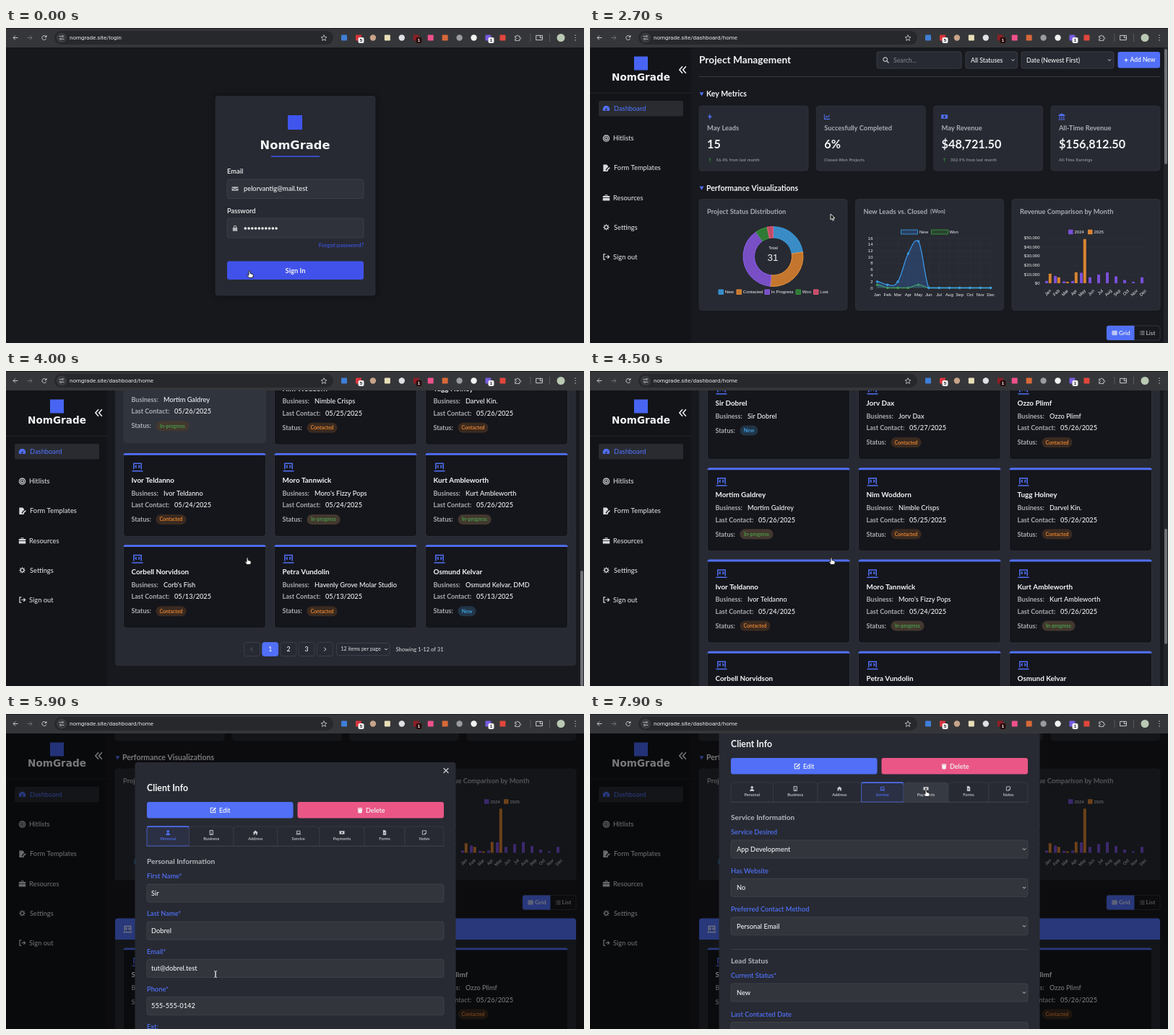
Write an HTML page with a canvas that moves like this. It is 800 by 437 pixels and loops after 8000 ms.

```html
<!DOCTYPE html>
<html lang="en">
<head>
<meta charset="utf-8">
<title>Lead dashboard</title>
<style>
html, body { margin: 0; width: 100%; height: 100%; overflow: hidden; background: #18191e; }
canvas { display: block; width: 800px; height: 437px; }
</style>
</head>
<body>
<canvas id="stage"></canvas>
<script>
const LOOP = 8000, BLUE = '#5170f7', WHITE = '#f3f4f6', GREY = '#a9acb3', CARD = '#272a32', PAGE = '#18191e';
const SANS = 'Lato, sans-serif', ARIAL = '"Liberation Sans", sans-serif', WIDE = '"DejaVu Sans", sans-serif';
const BRAND = 'NomGrade';
const MONTHS = 'Jan Feb Mar Apr May Jun Jul Aug Sep Oct Nov Dec'.split(' ');

const canvas = document.getElementById('stage'), ctx = canvas.getContext('2d');
const ratio = window.devicePixelRatio || 1;
canvas.width = 800 * ratio;
canvas.height = 437 * ratio;

// Icons live in a 16 x 16 box
const SOLID = {
  bolt: 'M9 0L3 9h4l-1 7 7-10H8z',
  money: 'M0 3h16v10H0zM8 5.5a2.5 2.5 0 1 0 .01 0z',
  bank: 'M8 0L0 4v2h16V4zM2 7h2v6H2zM7 7h2v6H7zM12 7h2v6h-2zM0 14h16v2H0z',
  gauge: 'M8 1a8 8 0 0 0-7 12h14a8 8 0 0 0-7-12zM11 4l-2 5a2 2 0 1 1-1.5-.5z',
  form: 'M1 0h8l3 3v3l-5 5v3h5v2H1zM15 6l-6 6v2h2l6-6z',
  kit: 'M5 1h6v3h5v4H0V4h5zM6.5 2.5V4h3V2.5zM0 9h16v6H0z',
  mail: 'M0 3h16v2L8 9 0 5zM0 6.5l8 4 8-4V13H0z',
  lock: 'M2 7h12v9H2zM4 7V5a4 4 0 0 1 8 0v2h-2V5a2 2 0 0 0-4 0v2z',
  trash: 'M1 2h4l1-1h4l1 1h4v2H1zM2 5h12l-1 11H3z',
  person: 'M8 0a4 4 0 1 0 .01 0zM1 16c0-9 14-9 14 0z',
  home: 'M8 1L0 8h2v7h4v-5h4v5h4V8h2z',
  file: 'M3 0h6l4 4v12H3zM5 8v1h6V8zM5 11v1h6v-1z',
  down: 'M0 2h16L8 15z',
  dots: 'M7 1h2v2H7zM7 7h2v2H7zM7 13h2v2H7z'
};
const LINE = {
  chart: 'M1 2v12h14M4 10l3-3 3 2 4-5',
  target: 'M8 1a7 7 0 1 0 .01 0zM8 4.5a3.5 3.5 0 1 0 .01 0zM7.5 8h1',
  gear: 'M8 4a4 4 0 1 0 .01 0zM8 1v3M8 12v3M1 8h3M12 8h3M3 3l2 2M11 11l2 2M13 3l-2 2M5 11l-2 2',
  exit: 'M6 2H2v12h4M6 8h9M11 4l4 4-4 4',
  code: 'M2.5 11V2.5h11V11M0 13.5h16M6.5 5L5 7l1.5 2M9.5 5L11 7 9.5 9',
  search: 'M6.5 1.5a5 5 0 1 0 .01 0zM10.5 10.5l4.5 4.5',
  grid: 'M1 2h14v12H1zM1 6h14M1 10h14M6 2v12M11 2v12',
  list: 'M5 3h11M5 8h11M5 13h11M1 3h2M1 8h2M1 13h2',
  edit: 'M9 2H2v12h12V8M7 9l7-7 1 1-7 7z',
  office: 'M3 1h10v14H3zM6 4h1M9 4h1M6 7h1M9 7h1M7 15v-4h2v4',
  laptop: 'M3 11V3h10v8zM0 13.5h16',
  note: 'M2 2h12v8l-4 4H2zM14 10h-4v4',
  collapse: 'M8 1L2 8l6 7M15 1L9 8l6 7',
  back: 'M15 8H2M8 2L2 8l6 6',
  next: 'M1 8h13M8 2l6 6-6 6',
  reload: 'M13.5 10a6 6 0 1 1-.5-5M14 1v5H9',
  tune: 'M1 4h6M11 2a2 2 0 1 0 .01 0zM9 12h6M5 10a2 2 0 1 0 .01 0z',
  star: 'M8 1l2 5 5 .5-4 3.5 1.3 5L8 12.3l-4.3 2.7L5 10 1 6.5 6 6z',
  puzzle: 'M2 4h4a2 2 0 1 1 4 0h3v4a2 2 0 1 1 0 3v4H2v-4a2 2 0 1 0 0-3z',
  panel: 'M1 3h14v10H1zM10 3v5h5',
  left: 'M10 3L5 8l5 5', right: 'M6 3l5 5-5 5', open: 'M2 5l6 6 6-6',
  close: 'M2 2l12 12M14 2L2 14', up: 'M8 15V2M4 6l4-4 4 4', plus: 'M8 1v14M1 8h14'
};
const CURSOR = {
  arrow: 'M0 0v8l1.9-1.7 1.3 2.9 1.3-.6-1.3-2.8H6z',
  hand: 'M-1 5.5V.8a1 1 0 0 1 2 0V3.5l3 .8q1.5.4 1.2 2L4.5 9.5H-.5L-3.5 5.8q.6-1.3 2.5.4z'
};

function box(x, y, w, h, r, fill, stroke, width = 0.8) {
  ctx.beginPath();
  ctx.roundRect(x, y, w, h, r);
  if (fill) { ctx.fillStyle = fill; ctx.fill(); }
  if (stroke) { ctx.strokeStyle = stroke; ctx.lineWidth = width; ctx.stroke(); }
}
function dot(x, y, r, fill) { box(x - r, y - r, 2 * r, 2 * r, r, fill); }
// y marks mid-height of capitals
function text(s, x, y, size, color = WHITE, weight = 500, align = 'left', face = SANS) {
  ctx.font = `${weight} ${size}px ${face}`;
  ctx.textAlign = align;
  ctx.fillStyle = color;
  ctx.fillText(s, x, y + size * 0.35);
}
function icon(name, x, y, size, color, width = 1.8) {
  ctx.save();
  ctx.translate(x - size / 2, y - size / 2);
  ctx.scale(size / 16, size / 16);
  ctx.fillStyle = ctx.strokeStyle = color;
  ctx.lineWidth = width;
  if (SOLID[name]) ctx.fill(new Path2D(SOLID[name]), 'evenodd');
  else ctx.stroke(new Path2D(LINE[name]));
  ctx.restore();
}
function track(keys, t, ease = u => u) {
  if (t <= keys[0][0]) return keys[0].slice(1);
  for (let i = 1; i < keys.length; i++) {
    const [a, b] = [keys[i - 1], keys[i]];
    if (t < b[0]) {
      const u = ease((t - a[0]) / (b[0] - a[0]));
      return a.slice(1).map((v, k) => v + (b[k + 1] - v) * u);
    }
  }
  return keys.at(-1).slice(1);
}
const smooth = u => u * u * (3 - 2 * u);
const clamp = u => Math.min(1, Math.max(0, u));

function browserBar(path) {
  box(0, 0, 800, 27, 0, '#353639');
  box(0, 0, 800, 1, 0, '#1c1c1e');
  icon('back', 13, 13.5, 8, '#d5d6d8');
  icon('next', 33, 13.5, 8, '#77787c');
  icon('reload', 53, 13.5, 8, '#d5d6d8');
  box(67, 4, 386, 19, 9.5, '#27282b');
  dot(77, 13.5, 7, '#3a3b3f');
  icon('tune', 77, 13.5, 7.5, '#d5d6d8');
  text(BRAND.toLowerCase() + '.site' + path, 88, 13.5, 8, '#e4e5e7', 400, 'left', 'Roboto, sans-serif');
  icon('star', 440, 13.5, 9, '#c9cacd', 1.5);
  const extensions = ['#3f7fd6', '#d8363c', '#c9a48a', '#e8dfb8', '#dfe1e4', '#8c1f25', '#f0508c', '#d8683a', '#9a9b9e', '#f1f1f1', '#7a5be0', '#e0463c'];
  extensions.forEach((color, i) => {
    const x = 468 + i * 19.95;
    if ([2, 4, 8, 9].includes(i)) dot(x, 13.5, 4.2, color);
    else box(x - 4, 9.5, 8, 8, 1, color);
  });
  [[491, '5'], [571, '1'], [671, '1']].forEach(([x, n]) => {
    box(x - 3.5, 13, 8, 8, 2, x === 571 ? '#2a0d10' : '#f0f0f2');
    text(n, x + 0.5, 17, 6, x === 571 ? '#fff' : '#222', 700, 'center', ARIAL);
  });
  icon('puzzle', 708, 13.5, 9, '#d5d6d8', 1.5);
  icon('panel', 738, 13.5, 10, '#d5d6d8', 1.5);
  box(725.5, 8, 1, 11, 0, '#5a5b60');
  box(752, 8, 1, 11, 0, '#5a5b60');
  dot(768, 13.5, 5.5, '#b9c9b4');
  icon('dots', 788, 13.5, 9, '#d5d6d8');
}

function login() {
  ctx.shadowColor = 'rgba(0,0,0,.4)';
  ctx.shadowBlur = 8;
  box(289.5, 94, 222, 277.5, 4, CARD);
  ctx.shadowBlur = 0;
  box(390, 121, 20, 20, 0, '#3f55ee');
  text(BRAND, 400, 162, 16.3, WHITE, 700, 'center', WIDE);
  box(367, 177.5, 67, 1.6, 0, '#3f55ee');
  text('Email', 306, 199, 9.3, WHITE, 600);
  box(306, 210, 189, 26.5, 3, '#2f323a', '#3f434c');
  icon('mail', 317, 223, 9, '#b4b6bb');
  text('pelorvantig@mail.test', 329, 223, 9.3);
  text('Password', 306, 253.5, 9.3, WHITE, 600);
  box(306, 264, 189, 27, 3, '#2f323a', '#3f434c');
  icon('lock', 317, 277.5, 8.5, '#b4b6bb');
  for (let i = 0; i < 10; i++) dot(331.3 + i * 4.75, 278, 1.8, WHITE);
  text('Forgot password?', 495, 301.5, 8, '#3f55ee', 500, 'right');
  box(306, 323.5, 189, 25.5, 3, '#4152ea');
  text('Sign In', 400.5, 336.5, 9.3, WHITE, 700, 'center');
}

function sidebar() {
  box(0, 27, 140, 410, 0, '#131418');
  box(61, 39.5, 19, 19, 0, '#4765f2');
  text(BRAND, 70.5, 68.5, 13.6, WHITE, 700, 'center', WIDE);
  icon('collapse', 128, 58, 11, WHITE, 2.2);
  box(0, 89.5, 140, 1, 0, '#25272c');
  box(12, 101, 117, 21.5, 3, '#292b30');
  const items = [['gauge', 'Dashboard'], ['target', 'Hitlists'], ['form', 'Form Templates'], ['kit', 'Resources'], ['gear', 'Settings'], ['exit', 'Sign out']];
  items.forEach(([name, label], i) => {
    const y = 112 + i * 41.1, color = i ? '#d9dade' : BLUE;
    icon(name, 22.5, y, 9.5, color, 2);
    text(label, i % 2 ? 32 : 33, y, 9.3, color);
  });
}

function select(label, x, w) {
  box(x, 33, w, 23, 3, CARD, '#3f434c');
  text(label, x + 7, 44.5, 8.7);
  icon('open', x + w - 6, 44.5, 5, WHITE, 3);
}
function section(label, y) {
  icon('down', 154.5, y, 6, BLUE);
  text(label, 161, y, 10.5, WHITE, 700);
}
function metric(i, name, label, value, note, rising) {
  const x = 151 + i * 162.3;
  box(x, 108, 151, 90, 4, CARD, '#30333b');
  icon(name, x + 15, 123, 9, BLUE);
  text(label, x + 11, 139, 9.3, GREY, 700);
  text(value, x + 11, 161.5, 16.2, WHITE, 700);
  if (rising) icon('up', x + 15, 183, 6, '#2f9a3c', 2);
  ctx.letterSpacing = '.3px';
  text(note, x + (rising ? 23.5 : 11), 183, 5.4, GREY);
  ctx.letterSpacing = '0px';
}

function doughnut(grow) {
  const parts = [['New', 7, '#3a8cc6', '#36a2eb', 178], ['Contacted', 9, '#c4762f', '#ff9f40', 203], ['In Progress', 12, '#784fc4', '#9966ff', 242], ['Won', 2, '#2f7a34', '#3fa046', 285], ['Lost', 1, '#c24b68', '#ff6384', 309.5]];
  let angle = -Math.PI / 2;
  for (const [label, count, fill, edge, x] of parts) {
    const end = angle + count / 31 * 2 * Math.PI * grow;
    ctx.beginPath();
    ctx.arc(253.5, 317, 41.5, angle, end);
    ctx.arc(253.5, 317, 26, end, angle, true);
    ctx.closePath();
    ctx.fillStyle = fill; ctx.strokeStyle = edge; ctx.lineWidth = 0.8;
    if (grow) { ctx.fill(); ctx.stroke(); }
    angle = end;
    box(x, 363, 6.5, 6.5, 0, fill, edge);
    text(label, x + 8.8, 366.3, 6, WHITE, 400, 'left', ARIAL);
  }
  text('Total', 253.5, 304.5, 6, WHITE, 400, 'center', ARIAL);
  text('31', 253, 318, 13.5, WHITE, 400, 'center', ARIAL);
}

function curve(values, color, fill, grow) {
  const px = i => 397.5 + i * 14.27, py = i => 360.5 - values[i] * 4.31 * grow;
  const limit = y => Math.min(360.5, Math.max(291.5, y));
  const slope = i => i && i < 11 ? (py(i + 1) - py(i - 1)) * 0.2 : 0;
  ctx.beginPath();
  ctx.moveTo(px(0), py(0));
  for (let i = 1; i < 12; i++)
    ctx.bezierCurveTo(px(i - 1) + 5.7, limit(py(i - 1) + slope(i - 1)), px(i) - 5.7, limit(py(i) - slope(i)), px(i), py(i));
  ctx.strokeStyle = color; ctx.lineWidth = 1.3;
  ctx.stroke();
  ctx.lineTo(px(11), 360.5);
  ctx.lineTo(px(0), 360.5);
  ctx.fillStyle = fill;
  ctx.fill();
  values.forEach((v, i) => dot(px(i), py(i), 1.7, color));
}
function lineChart(grow) {
  for (let n = 0; n <= 16; n += 2) {
    const y = 360.5 - n * 4.31;
    box(394, y, 161, 0.6, 0, '#30333b');
    text(n, 391.5, y, 6, WHITE, 400, 'right', ARIAL);
  }
  MONTHS.forEach((m, i) => {
    box(397.5 + i * 14.27, 291.5, 0.6, 72, 0, '#30333b');
    text(m, 397.5 + i * 14.27, 370, 6, WHITE, 400, 'center', ARIAL);
  });
  box(430.5, 280, 23, 6, 0, '#293f63', '#36a2eb');
  text('New', 456, 283, 6, WHITE, 400, 'left', ARIAL);
  box(472.5, 280, 23, 6, 0, '#28452f', '#3fa046');
  text('Won', 497.5, 283, 6, WHITE, 400, 'left', ARIAL);
  curve([1, 0, 0, 0, 1, 0, 0, 0, 0, 0, 0, 0], '#43a047', 'rgba(67,160,71,.25)', grow);
  curve([2, 1, 2, 11, 15, 0, 0, 0, 0, 0, 0, 0], '#3c9be8', 'rgba(54,120,220,.28)', grow);
}
function barChart(grow) {
  for (let k = 0; k <= 50; k += 10) {
    const y = 354 - k * 1.255;
    box(626, y, 144, 0.5, 0, '#2e3139');
    text(k ? `$${k},000` : '$0', 622.5, y, 6, WHITE, 400, 'right', ARIAL);
  }
  const series = [['2024', 662, '#784fd8', [2.5, 8, 2, 2.5, 11.5, 6.5, 9.5, 11.8, 7.5, 3.5, 1.5, 6.5]], ['2025', 689, '#d98432', [10.5, 6.5, 1.5, 12, 48.7]]];
  series.forEach(([year, x, color, values], s) => {
    box(x, 279.7, 6.5, 6.5, 0, color);
    text(year, x + 8.5, 283, 6, WHITE, 400, 'left', ARIAL);
    values.forEach((v, i) => box(630 + i * 12 + s * 4.8, 354 - v * 1.255 * grow, 4, v * 1.255 * grow, 0, color));
  });
  MONTHS.forEach((m, i) => {
    ctx.save();
    ctx.translate(637 + i * 12, 363.5);
    ctx.rotate(-Math.PI / 4);
    text(m, 0, 0, 6, WHITE, 400, 'right', ARIAL);
    ctx.restore();
  });
}

const LEADS = [
  ['Sir Dobrel', 'Sir Dobrel', '', 'New'], ['Jorv Dax', 'Jorv Dax', '27', 'Contacted'], ['Ozzo Plimf', 'Ozzo Plimf', '26', 'Contacted'],
  ['Mortim Galdrey', 'Mortim Galdrey', '26', 'In-progress'], ['Nim Woddorn', 'Nimble Crisps', '25', 'Contacted'], ['Tugg Holney', 'Darvel Kin.', '26', 'Contacted'],
  ['Ivor Teldanno', 'Ivor Teldanno', '24', 'Contacted'], ['Moro Tannwick', "Moro's Fizzy Pops", '24', 'In-progress'], ['Kurt Ambleworth', 'Kurt Ambleworth', '26', 'In-progress'],
  ['Corbell Norvidson', "Corb's Fish", '13', 'Contacted'], ['Petra Vundolin', 'Havenly Grove Molar Studio', '13', 'Contacted'], ['Osmund Kelvar', 'Osmund Kelvar, DMD', '13', 'New']
];
const STATUS = { New: ['#213547', '#42a5e8', 25], Contacted: ['#3b2a20', '#f08a30', 42], 'In-progress': ['#43382f', '#48a548', 46] };

function lead([name, business, day, status], i, hover) {
  const x = 162.5 + (i % 3) * 209, y = 486 + Math.floor(i / 3) * 127.25 - (hover ? 2.5 : 0);
  box(x, y, 197, 115.5, 4, hover ? '#30343d' : '#15161b', '#34373f');
  box(x, y, 197, 2.8, [4, 4, 0, 0], BLUE);
  icon('code', x + 19.5, y + 19.5, 15, BLUE, 1.6);
  text(name, x + 11, y + 37.5, 9.9, WHITE, 700);
  const row = (label, dy) => text(label, x + 11, y + dy, 9, GREY, 700);
  row('Business:', 55.5);
  text(business, x + 55.5, y + 55.5, 9.2);
  if (day) {
    row('Last Contact:', 72);
    text(`05/${day}/2025`, x + 70.5, y + 72, 9.2);
  }
  const sy = day ? 92 : 75.5, [fill, color, w] = STATUS[status];
  row('Status:', sy);
  box(x + 45, y + sy - 7, w, 14, 7, fill);
  text(status, x + 45 + w / 2, y + sy, 7, color, 600, 'center');
}

function dashboard(t, scroll) {
  ctx.save();
  ctx.translate(0, -scroll);
  text('Project Management', 151, 44.5, 13.7, WHITE, 700);
  box(397, 33, 117, 23, 3, CARD, '#3f434c');
  icon('search', 409.5, 44.5, 9, '#c5c7cb', 2.2);
  text('Search...', 420, 44.5, 8.7, '#7d8088');
  select('All Statuses', 520, 71.5);
  select('Date (Newest First)', 597, 128);
  box(730.5, 33, 58.5, 22.5, 3, BLUE);
  icon('plus', 742, 44.5, 6, WHITE, 3);
  text('Add New', 747.5, 44.5, 8.5, WHITE, 600);
  box(151, 67, 638, 1, 0, '#393b41');

  section('Key Metrics', 91.5);
  metric(0, 'bolt', 'May Leads', '15', '36.4% from last month', true);
  metric(1, 'chart', 'Succesfully Completed', '6%', 'Closed-Won Projects');
  metric(2, 'money', 'May Revenue', '$48,721.50', '302.9% from last month', true);
  metric(3, 'bank', 'All-Time Revenue', '$156,812.50', 'All-Time Earnings');

  section('Performance Visualizations', 222);
  ['Project Status Distribution', 'New Leads vs. Closed', 'Revenue Comparison by Month'].forEach((title, i) => {
    const x = 151 + i * 216.5;
    box(x, 237.5, 205, 154, 4, CARD, '#30333b');
    text(title, x + 11, 254.5, 9.25, GREY, 700);
  });
  text('(Won)', 471, 254.5, 7.8, GREY, 700);
  const grow = 1 - (1 - clamp((t - 1450) / 900)) ** 4;
  doughnut(grow);
  lineChart(grow);
  barChart(grow);

  box(715, 413, 74, 20, 3, PAGE, '#3a3d45');
  box(715, 413, 38.5, 20, [3, 0, 0, 3], BLUE);
  icon('grid', 726, 423, 7, WHITE);
  text('Grid', 732, 423, 8.3, WHITE, 600);
  icon('list', 764, 423, 7, '#c5c7cb');
  text('List', 769.5, 423, 8.3, '#c5c7cb');

  box(151, 445, 638, 590.5, 4, CARD);
  box(151, 445, 638, 29.5, [4, 4, 0, 0], BLUE);
  icon('code', 168.5, 460, 12, WHITE);
  text('Projects', 180, 460, 10.3, WHITE, 700);
  const hovered = t > 3600 && t < 4080 ? 3 : t >= 4080 && t < 4500 ? 9 : -1;
  LEADS.forEach((entry, i) => lead(entry, i, i === hovered));

  ['', '1', '2', '3', ''].forEach((n, i) => {
    const x = 329.5 + i * 25.2;
    box(x, 1003, 22, 19, 3, i === 1 ? BLUE : CARD, i === 1 ? BLUE : '#40434c');
    if (n) text(n, x + 11, 1012.5, 8.7, WHITE, 500, 'center');
    else icon(i ? 'right' : 'left', x + 11, 1012.5, 8, i ? WHITE : '#666a73');
  });
  box(457.5, 1004, 73.5, 17, 3, CARD, '#40434c');
  text('12 items per page', 463.5, 1012.5, 7, '#d5d6da');
  icon('open', 526, 1012.5, 5, WHITE, 3);
  text('Showing 1-12 of 31', 539.5, 1012.5, 7.6, '#d0d2d6');
  ctx.restore();
  sidebar();
}

const TABS = [
  ['Personal', 'person', 195, 'Personal Information'], ['Business', 'office', 253.5, 'Business Information'], ['Address', 'home', 315, 'Address Information'],
  ['Service', 'laptop', 375.5, 'Service Information'], ['Payments', 'money', 434, ''], ['Forms', 'file', 496, ''], ['Notes', 'note', 552, '']
];
const tabEnd = i => TABS[i + 1]?.[2] ?? 606;
const FIELDS = [
  [['First Name*', 'Sir'], ['Last Name*', 'Dobrel'], ['Email*', 'tut@dobrel.test'], ['Phone*', '555-555-0142'], ['Ext:', '']],
  [['Business Name', 'Sir Dobrel'], ['Business Email', ''], ['Business Phone', ''], ['Ext:', '']],
  [['Street', ''], ['City', ''], ['State', ''], ['Zip Code', '']],
  [['Service Desired', 'App Development'], ['Has Website', 'No'], ['Preferred Contact Method', 'Personal Email']]
];
function field(label, value, y, menu) {
  text(label, 195, y, 9.3, BLUE, 600);
  box(195, y + 11, 411, 25, 3, '#32353c', '#42454d');
  text(value, menu ? 203 : 201, y + 23.5, 9.3);
  if (menu) icon('open', 601, y + 23.5, 5.5, WHITE, 2.5);
}
function modal(tab, hover, scroll) {
  ctx.save();
  ctx.translate(0, -scroll);
  box(178.5, 67, 444, 620, 4, CARD);
  icon('close', 609, 78.5, 9, '#d9dade', 2.5);
  text('Client Info', 195, 103, 12.3, WHITE, 700);
  box(195, 122, 202.5, 22.5, 3, BLUE);
  icon('edit', 286.5, 133.5, 8.5, WHITE, 2);
  text('Edit', 295, 133.5, 9, WHITE, 600);
  box(403.5, 122, 202.5, 22.5, 3, '#ea5787');
  icon('trash', 490, 133.5, 8, WHITE);
  text('Delete', 498, 133.5, 9, WHITE, 600);
  box(195, 183, 411, 0.8, 0, '#42454f');
  TABS.forEach(([label, name, x], i) => {
    const w = tabEnd(i) - x, active = i === tab, color = active ? BLUE : '#c9cbd0';
    box(x, 156, w, 27, [4, 4, 0, 0], active ? '#2b3044' : i === hover ? '#363a43' : CARD, active ? BLUE : '#3d4049', 0.7);
    if (active) box(x, 155.5, w, 1.5, 1, BLUE);
    icon(name, x + w / 2, 164.5, 7, color, 2);
    text(label, x + w / 2, 173, 5.7, color, 600, 'center');
  });
  text(TABS[tab][3], 195, 204.5, 10.1, '#b3b5bb', 700);
  const service = tab === 3, step = service ? 53.4 : 52.2;
  FIELDS[tab].forEach(([label, value], i) => field(label, value, 225 + i * step, service));
  if (service) {
    box(195, 387, 411, 0.8, 0, '#42454f');
    text('Lead Status', 195, 403, 10.1, '#b3b5bb', 700);
    field('Current Status*', 'New', 424, true);
    field('Last Contacted Date', '', 477.5);
  }
  ctx.restore();
}

function cursor(x, y, kind) {
  ctx.save();
  ctx.translate(x, y);
  ctx.lineWidth = 0.9;
  if (kind === 'beam') {
    ctx.strokeStyle = '#e8e8ea';
    ctx.stroke(new Path2D('M-2-4.5q2 0 2 1.5v6q0 1.5-2 1.5M2-4.5q-2 0-2 1.5v6q0 1.5 2 1.5'));
  } else {
    const shape = new Path2D(CURSOR[kind]), hand = kind === 'hand';
    ctx.fillStyle = hand ? '#fff' : '#111';
    ctx.strokeStyle = hand ? '#111' : '#fff';
    ctx.fill(shape);
    ctx.stroke(shape);
  }
  ctx.restore();
}

const SCROLL = [[2720, 0], [3000, 60], [3200, 150], [3600, 440], [3850, 605], [3980, 626.5], [4300, 626.5], [4500, 480], [4850, 90], [5050, 0], [5150, 0], [5300, 51], [5480, 145], [5580, 161.5]];
const MOUSE = [[0, 337, 337], [2250, 337, 337], [2650, 333, 258], [3300, 333, 258], [3900, 334, 259], [5000, 334, 259], [5300, 321, 277], [5600, 290, 361], [6200, 290, 361], [6600, 285, 105], [6800, 285, 105], [7050, 346, 105], [7200, 346, 105], [7400, 405, 105], [7600, 405, 105], [7850, 465, 105]];
const MODAL_AT = 5680, TAB_CLICKS = [6700, 7100, 7450];

function draw(t) {
  const signedIn = t >= 1000, open = clamp((t - MODAL_AT) / 180);
  const [scroll] = track(SCROLL, t), [x, y] = track(MOUSE, t, smooth);
  ctx.setTransform(ratio, 0, 0, ratio, 0, 0);
  box(0, 0, 800, 437, 0, signedIn ? PAGE : '#17181c');
  if (signedIn) dashboard(t, scroll);
  else login();
  if (signedIn && !open) {
    box(794, 27, 6, 410, 0, '#242529');
    box(795, 29 + scroll * 0.396, 4, 160, 2, '#707176');
  }
  if (open) {
    const [inner] = track([[6150, 0], [6550, 61]], t, smooth);
    const tab = TAB_CLICKS.filter(at => t >= at).length;
    const hover = t > 6550 ? TABS.findIndex(([, , left], i) => x >= left && x < tabEnd(i)) : -1;
    ctx.globalAlpha = open;
    box(0, 27, 800, 410, 0, 'rgba(0,0,0,.5)');
    modal(tab, hover, inner);
    ctx.globalAlpha = 1;
  }
  browserBar(signedIn ? '/dashboard/home' : '/login');
  const hand = !signedIn || (t > 3450 && t < 4600) || (t > 5500 && t < MODAL_AT) || t > 6550;
  cursor(x, y, hand ? 'hand' : t >= MODAL_AT ? 'beam' : 'arrow');
}

function tick() {
  draw(performance.now() % LOOP);
  requestAnimationFrame(tick);
}
tick();
</script>
</body>
</html>
```
